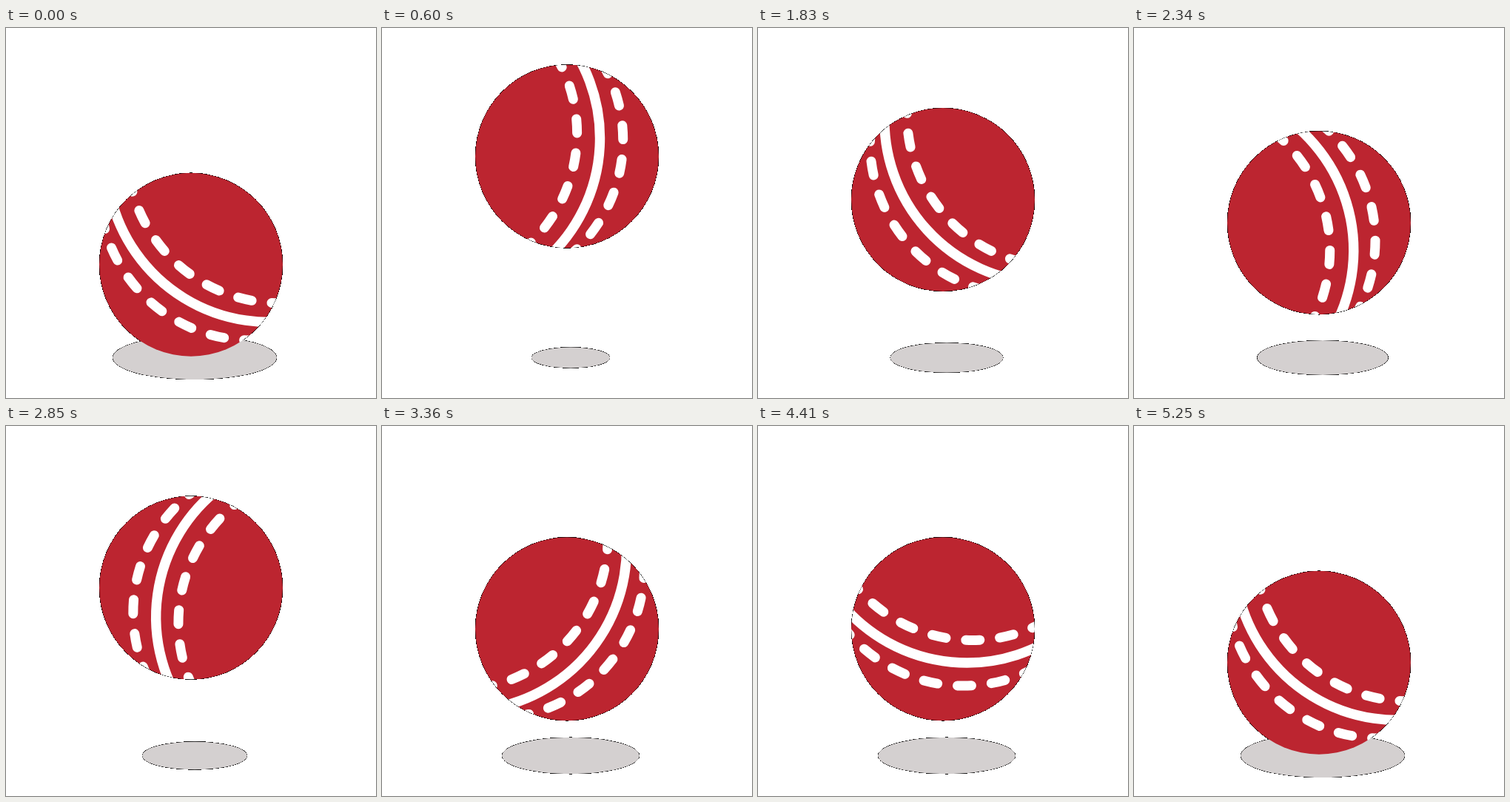
Write an HTML page with a canvas that moves like this. It is 500 px wide and 500 px high and loops after 5.28 s.

```html
<!DOCTYPE html>
<html lang="en">
<head>
<meta charset="utf-8">
<title>Bouncing cricket ball</title>
<style>
  html, body { margin: 0; width: 100%; height: 100%; overflow: hidden; background: #fff; }
  canvas { display: block; width: 500px; height: 500px; }
</style>
</head>
<body>
<canvas id="stage" width="500" height="500"></canvas>
<script>
const SIZE = 500, STEP = 30, STEPS = 176;
const BOUNCE = 35, RISE = 19;
const BALL = { x: 250, y: 319.75, r: 124, lift: 148 };
const SHADOW = { x: 255, y: 445.5, rx: 111, shrink: 58.5, ratio: 0.2665 };
const RED = '#bc2530', GREY = '#d4d0d0', WHITE = '#fff';
const TURN = 6 * 360 / 179, START = 126.6;
const RIM = 48; // faintest rim opacity that still shows

const ctx = document.getElementById('stage').getContext('2d', { willReadFrequently: true });
const rad = deg => deg * Math.PI / 180;
const ease = u => u * u * (3 - 2 * u);

// 0 on the ground, 1 at the top
function height(n) {
  const p = n % BOUNCE;
  return p < RISE ? ease(p / RISE) : 1 - ease((p - RISE) / (BOUNCE - RISE));
}

function arc(x, y, r, from, to, width) {
  ctx.beginPath();
  ctx.arc(x, y, r, rad(from), rad(to));
  ctx.lineWidth = width;
  ctx.stroke();
}

function ellipse(x, y, rx, ry, color) {
  ctx.fillStyle = color;
  ctx.beginPath();
  ctx.ellipse(x, y, rx, ry, 0, 0, 2 * Math.PI);
  ctx.fill();
}

function stitches(x) {
  for (let k = -3; k <= 3; k++) {
    const mid = 2.05 - 12.8 * k;
    arc(x, -4, 206, mid - 2.64, mid + 2.64, 13);
  }
}

// Hard silhouette: soft rim pixels become either dark or white
function hardenEdges() {
  const img = ctx.getImageData(0, 0, SIZE, SIZE), d = img.data;
  for (let i = 0; i < d.length; i += 4) {
    const a = d[i + 3];
    if (a === 255 || a === 0) continue;
    const f = (a / 255) ** 2;
    for (let c = 0; c < 3; c++) d[i + c] = a < RIM ? 255 : d[i + c] * f;
    d[i + 3] = 255;
  }
  ctx.putImageData(img, 0, 0);
}

function draw(n) {
  const h = height(n);
  const y = BALL.y - BALL.lift * h;
  ctx.clearRect(0, 0, SIZE, SIZE);
  ellipse(BALL.x, y, BALL.r, BALL.r, RED);

  ctx.save();
  ctx.globalCompositeOperation = 'source-atop';
  ctx.translate(BALL.x, y);
  ctx.rotate(rad(START + TURN * n));
  ctx.strokeStyle = WHITE;
  ctx.lineCap = 'round';
  arc(-177.2, 0, 220, -50, 50, 13.4);
  stitches(-194.8);
  stitches(-132.1);
  ctx.restore();

  ctx.save();
  ctx.globalCompositeOperation = 'destination-over';
  const rx = SHADOW.rx - SHADOW.shrink * h;
  ellipse(SHADOW.x, SHADOW.y, rx, rx * SHADOW.ratio, GREY);
  ctx.restore();

  hardenEdges();
}

const begin = performance.now();
let last = -1;

function tick() {
  const t = Math.max(0, performance.now() - begin);
  // the closing step shows the opening pose again
  const n = Math.floor(t / STEP) % STEPS % (STEPS - 1);
  if (n !== last) draw(last = n);
  requestAnimationFrame(tick);
}
tick();
</script>
</body>
</html>
```
